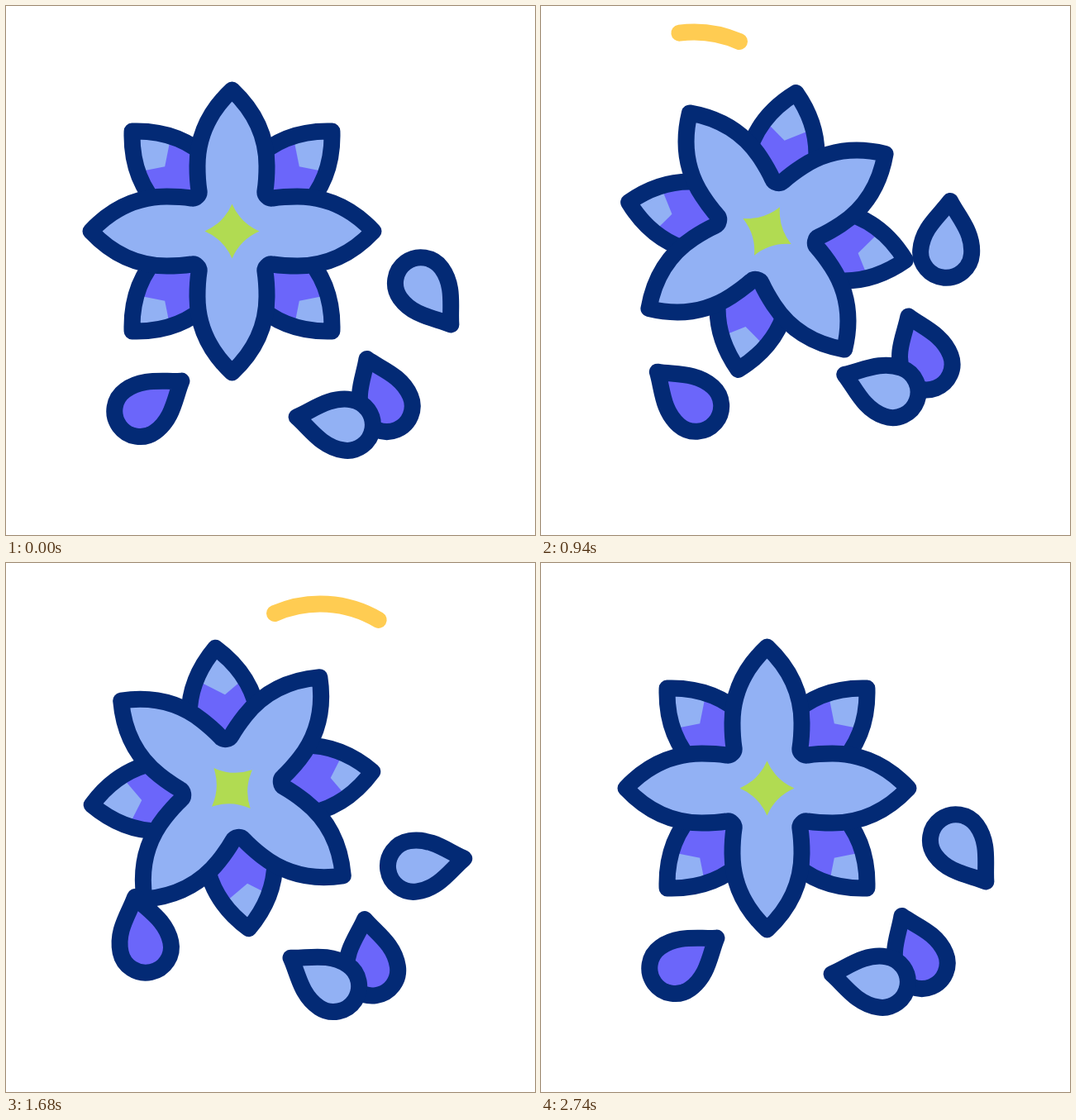
These frames come from a looping animation (640x640 px, 2.86 s). An HTML page without scripts:

```html
<!DOCTYPE html>
<html lang="en">
<head>
<meta charset="utf-8">
<title>Swaying flower</title>
<style>
  html, body { margin: 0; width: 100%; height: 100%; overflow: hidden; background: #fff; }
  svg { display: block; width: 100%; height: 100%; }

  :root {
    --navy: #032a75; --light: #92b1f4; --purple: #6b66fa;
    --green: #b1db52; --yellow: #ffcc52;
    --ease: cubic-bezier(.33, 0, .67, 1);
  }
  .outline { stroke: var(--navy); stroke-width: 20; stroke-linejoin: round; }
  .light { fill: var(--light); }
  .purple { fill: var(--purple); }
  .none { fill: none; }
  .move, .spin, .sway, .core, .arc { animation: 2860ms var(--ease) infinite; }

  /* flower */
  .spin { animation-name: spin; }
  .sway { animation-name: sway; }
  .core { animation-name: core; fill: var(--green); }
  @keyframes spin {
    0%, 7% { rotate: 0deg; }
    30.1%, 31.5% { rotate: 58deg; }
    54.5% { rotate: -52deg; }
    67.8% { rotate: -51deg; }
    86.7%, 100% { rotate: 0deg; }
  }
  @keyframes sway {
    0%, 7% { translate: 0 3px; }
    28% { translate: -3px 3px; }
    59.4%, 69.9% { translate: 5px 1px; }
    95.8%, 100% { translate: 0 3px; }
  }
  @keyframes core {
    0%, 7% { rotate: 0deg; }
    23.8% { rotate: 47deg; }
    55.2% { rotate: -46deg; }
    79.7% { rotate: 20deg; }
    95.8%, 100% { rotate: 0deg; }
  }

  /* loose petals: a shared path rhythm, each with its own turn */
  .move { animation-name: move, var(--turn); }
  @keyframes move {
    0%, 7% { translate: var(--rest); }
    29.7% { translate: var(--lift); }
    50.3% { translate: var(--drop); }
    68.5% { translate: var(--rise); }
    95.8%, 100% { translate: var(--rest); }
  }
  .east  { --turn: turn-east;  --rest: 509px 345px; --lift: 489px 275px; --drop: 521px 440px; --rise: 485px 273px; }
  .front { --turn: turn-front; --rest: 401px 505px; --lift: 418px 457px; --drop: 361px 548px; --rise: 417px 453px; }
  .back  { --turn: turn-back;  --rest: 456px 473px; --lift: 465px 414px; --drop: 423px 538px; --rise: 464px 410px; }
  .west  { --turn: turn-west;  --rest: 172px 483px; --lift: 180px 479px; --drop: 153px 431px; --rise: 183px 480px; }
  @keyframes turn-east {
    0%, 95.8%, 100% { rotate: 144deg; }
    7% { rotate: 144deg; animation-timing-function: cubic-bezier(.33, 0, .5, 1); }
    40.2% { rotate: -6deg; animation-timing-function: cubic-bezier(.75, 0, .8, 1); }
    54.5% { rotate: 92deg; }
    78.3% { rotate: -32deg; }
  }
  @keyframes turn-west {
    0%, 95.8%, 100% { rotate: 54deg; }
    7% { rotate: 54deg; animation-timing-function: cubic-bezier(.33, 0, .4, 1); }
    35% { rotate: -49deg; animation-timing-function: cubic-bezier(.6, 0, .7, 1); }
    54.5% { rotate: -6deg; animation-timing-function: cubic-bezier(.33, 0, .4, 1); }
    78.7% { rotate: -61deg; }
  }
  @keyframes turn-front {
    0%, 7%, 95.8%, 100% { rotate: -81deg; }
    22.7% { rotate: -67deg; }
    30.8% { rotate: -71deg; }
    50.3% { rotate: -42deg; }
    68.5% { rotate: -74deg; }
  }
  @keyframes turn-back {
    0%, 7%, 95.8%, 100% { rotate: -23deg; }
    21% { rotate: -8deg; }
    33.6% { rotate: -21deg; }
    49% { rotate: 6deg; }
    68.5% { rotate: -23deg; }
    79% { rotate: -34deg; }
  }

  /* wind arcs: drawn, then wiped from the tail */
  .arc {
    fill: none; stroke: var(--yellow); stroke-width: 20; stroke-linecap: round;
    stroke-dasharray: 0 3; visibility: hidden;
  }
  .gust { animation-name: gust; }
  .return { animation-name: return; }
  @keyframes gust {
    0%, 14.7% { stroke-dasharray: 0 3; stroke-dashoffset: 0; visibility: hidden; }
    14.8% { visibility: visible; }
    25.7% { stroke-dasharray: 1 3; stroke-dashoffset: 0; }
    36.6% { visibility: visible; }
    36.7%, 100% { stroke-dasharray: 0 3; stroke-dashoffset: -1; visibility: hidden; }
  }
  @keyframes return {
    0%, 42% { stroke-dasharray: 0 3; stroke-dashoffset: 0; visibility: hidden; }
    42.1% { visibility: visible; }
    53.1% { stroke-dasharray: 1 3; stroke-dashoffset: 0; }
    64.2% { visibility: visible; }
    64.3%, 100% { stroke-dasharray: 0 3; stroke-dashoffset: -1; visibility: hidden; }
  }
</style>
</head>
<body>
<svg viewBox="0 0 640 640">
  <defs>
    <path id="star" d="M0-171
      C32-141 42-108 42-79Q42-62 40-49C39-44 44-39 49-40Q62-42 79-42C108-42 141-32 171 0
      C141 32 108 42 79 42Q62 42 49 40C44 39 39 44 40 49Q42 62 42 79C42 108 32 141 0 171
      C-32 141-42 108-42 79Q-42 62-40 49C-39 44-44 39-49 40Q-62 42-79 42C-108 42-141 32-171 0
      C-141-32-108-42-79-42Q-62-42-49-40C-44-39-39-44-40-49Q-42-62-42-79C-42-108-32-141 0-171Z"/>
    <path id="tip" d="M0-115 45-145V-190H-45V-145Z"/>
    <path id="petal" d="M0-50C11-32 31-15 31 12A31 31 0 0 1-31 12C-31-15-11-32 0-50Z"/>
    <clipPath id="inside"><use href="#star" class="spin" transform="rotate(45)"/></clipPath>
  </defs>

  <path class="arc gust" pathLength="1" d="M47 165A138 138 0 0 1 240 43"/>
  <path class="arc return" pathLength="1" d="M518 181A138 138 0 0 0 325 61"/>

  <g transform="translate(273.5 272.5)">
    <g class="spin"><use href="#star" class="purple" transform="rotate(45)"/></g>
    <g clip-path="url(#inside)">
      <g class="sway">
        <g class="spin light">
          <use href="#tip" transform="rotate(45)"/>
          <use href="#tip" transform="rotate(135)"/>
          <use href="#tip" transform="rotate(225)"/>
          <use href="#tip" transform="rotate(315)"/>
        </g>
      </g>
    </g>
    <g class="spin">
      <use href="#star" class="outline none" transform="rotate(45)"/>
      <use href="#star" class="outline light"/>
    </g>
    <path class="core" d="M0-33Q10-10 33 0 10 10 0 33-10 10-33 0-10-10 0-33Z"/>
  </g>

  <g class="outline">
    <use href="#petal" class="move east light"/>
    <use href="#petal" class="move west purple"/>
    <use href="#petal" class="move back purple"/>
    <use href="#petal" class="move front light"/>
  </g>
</svg>
</body>
</html>
```
